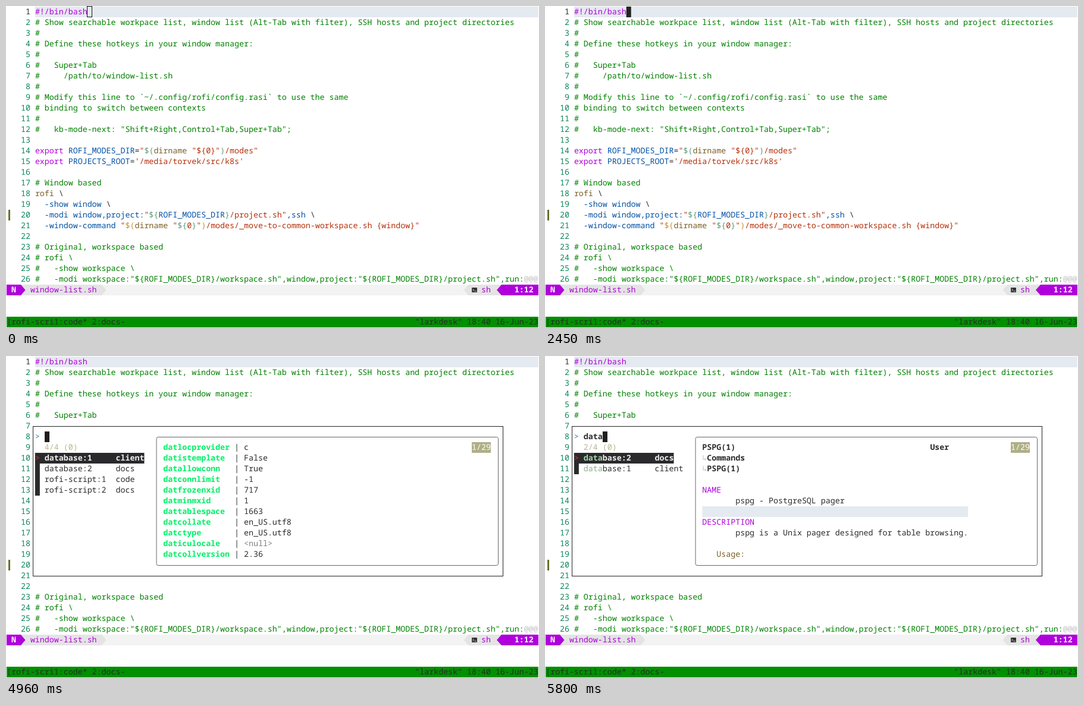
These frames come from a looping animation (896x542 px, 8 s). An HTML page:

```html
<!DOCTYPE html>
<html lang="en">
<head>
<meta charset="utf-8">
<title>Terminal session switcher</title>
<style>
html, body { margin: 0; width: 100%; height: 100%; overflow: hidden; background: #fff; }
svg { display: block; width: 896px; height: 542px; }
text {
  font: 13.3px "Noto Sans Mono", "DejaVu Sans Mono", monospace;
  white-space: pre;
  text-rendering: geometricPrecision;
  font-variant-ligatures: none;
  fill: #2b2b2b;
}
.bold { font-weight: 700; }
.comment { fill: #008000; }
.key { fill: #af00db; }
.name { fill: #0451a5; }
.str { fill: #b5300a; }
.func { fill: #795e26; }
.sub { fill: #5a9a78; }
.paren { fill: #c8902c; }
.num { fill: #098658; }
.white { fill: #fff; }
.pale { fill: #c2c2c2; }
.grey { fill: #808080; }
.info { fill: #b8b78f; }
.prompt { fill: #6fa3c8; }
.mark { fill: #d7372f; }
.sel { fill: #f0f0f0; font-weight: 700; }
.field { fill: #00f068; font-weight: 700; }
.hit { fill: #87af87; }
.selhit { fill: #a9d6a9; font-weight: 700; }

#hollow, #block, #popup, #ui, #db, #docs, .typed1, .typed2, .typed3, .typed4,
#caret, .hit3, .hit4 { animation: 8s step-end infinite; }
#hollow { animation-name: hollow; }
#block { animation-name: block; visibility: hidden; }
#popup { animation-name: popup; visibility: hidden; }
#ui { animation-name: ui; visibility: hidden; }
#db { animation-name: db; visibility: hidden; }
#docs { animation-name: typed2; visibility: hidden; }
.typed1 { animation-name: typed1; visibility: hidden; }
.typed2 { animation-name: typed2; visibility: hidden; }
.typed3 { animation-name: typed3; visibility: hidden; }
.typed4 { animation-name: typed4; visibility: hidden; }
#caret { animation-name: caret; }
.hit3 { animation-name: hit3; }
.hit4 { animation-name: hit4; }

@keyframes hollow { 0% { visibility: visible } 22.75%, 100% { visibility: hidden } }
@keyframes block { 0% { visibility: hidden } 22.75% { visibility: visible } 31.375%, 100% { visibility: hidden } }
@keyframes popup { 0% { visibility: hidden } 31.375%, 100% { visibility: visible } }
@keyframes ui { 0% { visibility: hidden } 32.25%, 100% { visibility: visible } }
@keyframes db { 0% { visibility: hidden } 33.75% { visibility: visible } 63.875%, 100% { visibility: hidden } }
@keyframes typed1 { 0% { visibility: hidden } 62.625%, 100% { visibility: visible } }
@keyframes typed2 { 0% { visibility: hidden } 63.875%, 100% { visibility: visible } }
@keyframes typed3 { 0% { visibility: hidden } 66.25%, 100% { visibility: visible } }
@keyframes typed4 { 0% { visibility: hidden } 68.5%, 100% { visibility: visible } }
@keyframes caret {
  0% { transform: translateX(-15.96px) }
  32.25% { transform: none }
  62.625% { transform: translateX(7.98px) }
  63.875% { transform: translateX(15.96px) }
  66.25% { transform: translateX(23.94px) }
  68.5%, 100% { transform: translateX(31.92px) }
}
/* Letters keep their plain colour until they match the query. */
@keyframes hit3 { 0% { fill: var(--plain) } 66.25%, 100% { fill: var(--match) } }
@keyframes hit4 { 0% { fill: var(--plain) } 68.5%, 100% { fill: var(--match) } }
.onsel { --plain: #f0f0f0; --match: #a9d6a9; font-weight: 700; }
.onrow { --plain: #2b2b2b; --match: #87af87; }
</style>
</head>
<body>
<svg viewBox="0 0 896 542">
  <g id="editor"></g>
  <rect id="hollow" x="136.5" y="0.5" width="8" height="18" fill="none" stroke="#111"/>
  <rect id="block" x="136.7" y="1" width="8" height="18" fill="#222"/>
  <g id="popup">
    <rect x="41" y="109" width="798" height="270" fill="#fff"/>
    <rect x="45.5" y="118.5" width="790" height="252" fill="none" stroke="#222"/>
    <rect id="caret" x="65" y="127" width="8" height="18" fill="#1e1e1e"/>
  </g>
  <g id="ui"></g>
  <g id="db"></g>
  <g id="docs"></g>
</svg>
<script>
const NS = 'http://www.w3.org/2000/svg';
const CW = 7.98, RH = 18, X0 = 1;
const $ = id => document.getElementById(id);
const colX = c => X0 + c * CW;

function add(parent, tag, attrs) {
  const el = document.createElementNS(NS, tag);
  for (const k in attrs) el.setAttribute(k, attrs[k]);
  return parent.appendChild(el);
}

// Rows count from 1, columns from 0; runs alternate class and text.
function put(g, row, col, ...runs) {
  const t = add(g, 'text', { x: colX(col), y: RH * row - 4 });
  for (let i = 0; i < runs.length; i += 2)
    add(t, 'tspan', { class: runs[i] }).textContent = runs[i + 1];
}

function fill(g, row, col, cells, color) {
  return add(g, 'rect', { x: colX(col), y: RH * (row - 1) + 1, width: cells * CW, height: RH, fill: color });
}

function poly(g, points, color) {
  add(g, 'polygon', { points, fill: color });
}

function drawEditor() {
  const g = $('editor');
  const note = s => ['comment', s];
  const lines = [
    ['key', '#!/bin/bash'],
    note('# Show searchable workpace list, window list (Alt-Tab with filter), SSH hosts and project directories'),
    note('#'),
    note('# Define these hotkeys in your window manager:'),
    note('#'),
    note('#   Super+Tab'),
    note('#     /path/to/window-list.sh'),
    note('#'),
    note('# Modify this line to `~/.config/rofi/config.rasi` to use the same'),
    note('# binding to switch between contexts'),
    note('#'),
    note('#   kb-mode-next: "Shift+Right,Control+Tab,Super+Tab";'),
    [],
    ['key', 'export ', 'name', 'ROFI_MODES_DIR', '', '=', 'str', '"', 'sub', '$(', 'func', 'dirname ',
      'str', '"${0}"', 'sub', ')', 'str', '/modes"'],
    ['key', 'export ', 'name', 'PROJECTS_ROOT', '', '=', 'str', "'/media/torvek/src/k8s'"],
    [],
    note('# Window based'),
    ['func', 'rofi ', '', '\\'],
    ['name', '  -show window ', '', '\\'],
    ['name', '  -modi window,project:', 'str', '"', 'sub', '${', 'name', 'ROFI_MODES_DIR', 'sub', '}',
      'str', '/project.sh"', 'name', ',ssh ', '', '\\'],
    ['name', '  -window-command ', 'str', '"', 'paren', '$(', 'func', 'dirname ', 'str', '"', 'sub', '${',
      'str', '0', 'sub', '}', 'str', '"', 'paren', ')', 'str', '/modes/_move-to-common-workspace.sh {window}"'],
    [],
    note('# Original, workspace based'),
    note('# rofi \\'),
    note('#   -show workspace \\'),
    ['comment', '#   -modi workspace:"${ROFI_MODES_DIR}/workspace.sh",window,project:"${ROFI_MODES_DIR}/project.sh",run:',
      'pale', '@@@']
  ];
  fill(g, 1, 6, 106, '#e5e9f0');
  lines.forEach((runs, i) => {
    const n = i + 1;
    put(g, n, n < 10 ? 4 : 3, n > 1 ? 'num' : '', String(n));
    if (runs.length) put(g, n, 6, ...runs);
  });
  add(g, 'rect', { x: 4, y: 343, width: 3, height: 18, fill: '#66702a' });

  fill(g, 27, 0, 112, '#f3f3f3');
  poly(g, '25,469 160.6,469 168.5,478 160.6,487 25,487', '#e4e4e4');
  poly(g, '1,469 25,469 32.5,478 25,487 1,487', '#af00db');
  poly(g, '777.5,469 895,469 895,487 777.5,487 769.5,478', '#e4e4e4');
  poly(g, '833,469 895,469 895,487 833,487 825,478', '#af00db');
  put(g, 27, 1, 'white bold', 'N');
  put(g, 27, 5, 'key', 'window-list.sh');
  add(g, 'rect', { x: 783, y: 474, width: 9, height: 8, rx: 1, fill: '#333' });
  add(g, 'path', { d: 'M784.5 476l2 2-2 2M787.5 480h3', fill: 'none', stroke: '#e4e4e4', 'stroke-width': 0.9 });
  put(g, 27, 100, 'key', 'sh');
  put(g, 27, 107, 'white bold', '1:12');

  fill(g, 30, 0, 112, '#009000');
  put(g, 30, 0, '', '[rofi-scri1:code* 2:docs-');
  put(g, 30, 86, '', '"larkdesk" 18:40 16-Jun-23');
}

function drawQuery() {
  const g = $('ui');
  put(g, 8, 6, 'prompt bold', '>');
  [...'data'].forEach((ch, i) => put(g, 8, 8 + i, 'bold typed' + (i + 1), ch));
}

function drawList(g, count, rows, width) {
  put(g, 9, 8, 'info', count);
  fill(g, 10, 6, width, '#2a2a2c');
  fill(g, 11, 6, 1, '#2a2a2c').setAttribute('height', RH * (rows.length - 1));
  put(g, 10, 6, 'mark', '>');
  rows.forEach((runs, i) => put(g, 10 + i, 8, ...runs));
}

function drawPreviewFrame(g) {
  add(g, 'rect', { x: 253, y: 136.5, width: 574.5, height: 216, rx: 3, fill: '#fff', stroke: '#666' });
  fill(g, 9, 98, 4, '#afaf87');
  put(g, 9, 98, 'white', '1/29');
}

function drawDatabase() {
  const g = $('db');
  drawPreviewFrame(g);
  const fields = [
    ['datlocprovider', 'c'], ['datistemplate', 'False'], ['datallowconn', 'True'],
    ['datconnlimit', '-1'], ['datfrozenxid', '717'], ['datminmxid', '1'],
    ['dattablespace', '1663'], ['datcollate', 'en_US.utf8'], ['datctype', 'en_US.utf8'],
    ['daticulocale', '<null>'], ['datcollversion', '2.36']
  ];
  fields.forEach(([key, value], i) => {
    put(g, 9 + i, 33, 'field', key);
    put(g, 9 + i, 48, '', '| ', value === '<null>' ? 'grey' : '', value);
  });
}

function drawDocs() {
  const g = $('docs');
  add(g, 'rect', { x: 48, y: 145, width: 190, height: 92, fill: '#fff' });
  drawList(g, '2/4 (0)', [
    ['selhit', 'da', 'onsel hit3', 't', 'onsel hit4', 'a', 'sel', 'base:2     docs'],
    ['hit', 'da', 'onrow hit3', 't', 'onrow hit4', 'a', '', 'base:1     client']
  ], 21);
  drawPreviewFrame(g);
  put(g, 9, 33, 'bold', 'PSPG(1)');
  put(g, 9, 81, 'bold', 'User');
  ['Commands', 'PSPG(1)'].forEach((s, i) => {
    put(g, 10 + i, 33, 'pale', '↳');
    put(g, 10 + i, 34, 'bold', s);
  });
  put(g, 13, 33, 'key', 'NAME');
  put(g, 14, 40, '', 'pspg - PostgreSQL pager');
  fill(g, 15, 33, 56, '#e5e9f0');
  put(g, 16, 33, 'key', 'DESCRIPTION');
  put(g, 17, 40, '', 'pspg is a Unix pager designed for table browsing.');
  put(g, 19, 36, 'func', 'Usage:');
}

drawEditor();
drawQuery();
drawList($('ui'), '4/4 (0)', [
  ['sel', 'database:1     client'],
  ['', 'database:2     docs'],
  ['', 'rofi-script:1  code'],
  ['', 'rofi-script:2  docs']
], 23);
drawDatabase();
drawDocs();
</script>
</body>
</html>
```
